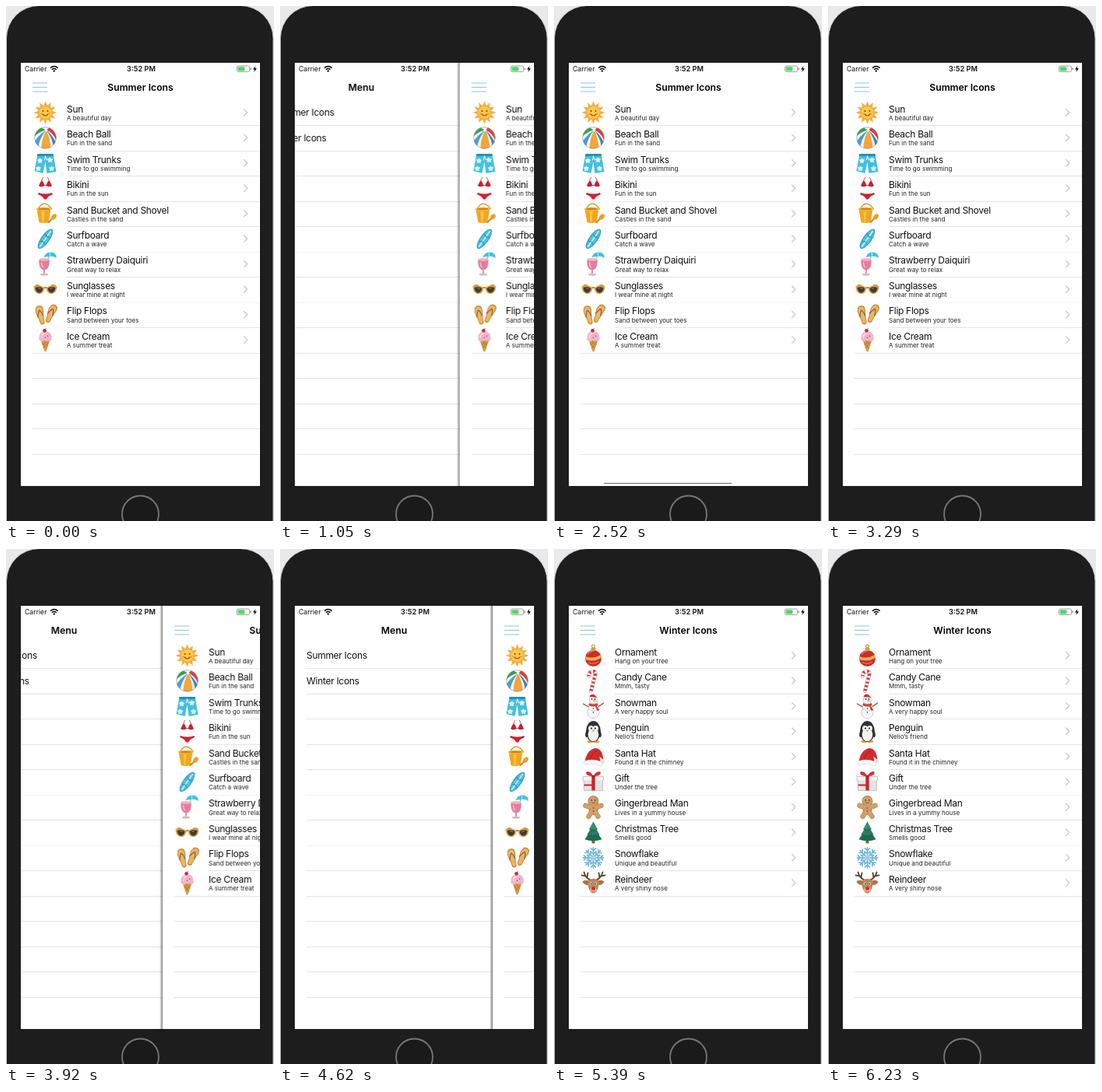
Animation of 344x662 px, one loop 6300 ms. Source, as an HTML page:

```html
<!DOCTYPE html>
<html lang="en">
<head>
<meta charset="utf-8">
<title>Side menu</title>
<style>
  html, body { margin: 0; width: 100%; height: 100%; overflow: hidden; background: #e9e9eb; }
  svg { display: block; width: 344px; height: 662px; }
  text { font-family: Inter, Roboto, sans-serif; fill: #111; }
  .name { font-size: 12px; letter-spacing: -.3px; }
  .sub { font-size: 8px; letter-spacing: .03px; fill: #222; }
  .title { font-size: 12.2px; font-weight: 600; text-anchor: middle; fill: #000; }
  .slide, .under, .dim, .push, .old, .new, .mark { animation: 6300ms linear infinite; }
  .slide { animation-name: slide; }
  .under { animation-name: under; }
  .dim { animation-name: dim; }
  .push { animation-name: push; }
  .old { animation-name: old; }
  .new { animation-name: new; }
  .mark { animation-name: mark; animation-timing-function: step-end; }
  @keyframes slide {
    0%, 36.762%, 80.24%, 100% { transform: translateX(0); }
    18.254%, 64.286% { transform: translateX(254px); }
    12.698%, 58.73% { transform: translateX(0); animation-timing-function: ease-in-out; }
    31.206%, 74.603% { transform: translateX(254px); animation-timing-function: ease-in-out; }
  }
  @keyframes under {
    0% { transform: translateX(0); }
    75.238% { transform: translateX(0); animation-timing-function: cubic-bezier(.33, 1, .68, 1); }
    83.175%, 100% { transform: translateX(-92px); }
  }
  @keyframes dim {
    0% { opacity: 0; }
    75.238% { opacity: 0; animation-timing-function: cubic-bezier(.33, 1, .68, 1); }
    83.175%, 100% { opacity: .1; }
  }
  @keyframes push {
    0% { transform: translateX(307px); }
    75.238% { transform: translateX(307px); animation-timing-function: cubic-bezier(.33, 1, .68, 1); }
    83.175%, 100% { transform: translateX(0); }
  }
  @keyframes old {
    0% { opacity: 1; transform: translateX(0); }
    75.238% { opacity: 1; transform: translateX(0); animation-timing-function: cubic-bezier(.33, 1, .68, 1); }
    80%, 100% { opacity: 0; transform: translateX(-25px); }
  }
  @keyframes new {
    0% { opacity: 0; transform: translateX(25px); }
    75.238% { opacity: 0; transform: translateX(25px); animation-timing-function: cubic-bezier(.33, 1, .68, 1); }
    83.175%, 100% { opacity: 1; transform: translateX(0); }
  }
  @keyframes mark {
    0% { opacity: 0; }
    32.2% { opacity: 1; }
    46.6%, 100% { opacity: 0; }
  }
</style>
</head>
<body>
<svg viewBox="0 0 344 662">
  <defs>
    <clipPath id="screen"><rect x="19" y="73" width="307" height="544"/></clipPath>
    <linearGradient id="edge">
      <stop offset="0" stop-color="#000" stop-opacity="0"/>
      <stop offset="1" stop-color="#000" stop-opacity=".5"/>
    </linearGradient>
  </defs>
  <rect y="72" width="3" height="143" fill="#333"/>
  <rect x=".5" y="-.5" width="342.5" height="760" rx="42" fill="#1d1d1e" stroke="#cfcfd2"/>
  <circle cx="172.5" cy="653" r="23.5" fill="#1a1a1b" stroke="#77777a" stroke-width="1.8"/>
  <g clip-path="url(#screen)">
    <rect x="19" y="73" width="307" height="544" fill="#fff"/>
    <g class="slide">
      <g id="menu" transform="translate(-254)"></g>
      <rect x="15" y="73" width="4" height="544" fill="url(#edge)"/>
      <g clip-path="url(#screen)">
        <g class="under" id="summer"></g>
        <rect class="dim" x="19" y="73" width="307" height="544"/>
        <g class="push" id="winter"></g>
        <rect x="19" y="73" width="307" height="48" fill="#fff"/>
        <path d="M34 99H53M34 104.5H53M34 110H53" stroke="#8cc3e6" stroke-width="1.2"/>
        <text class="title old" x="172.5" y="109">Summer Icons</text>
        <text class="title new" x="172.5" y="109">Winter Icons</text>
      </g>
    </g>
    <rect class="mark" x="64" y="613" width="164" height="1.2" fill="#777"/>
    <text x="24" y="84.3" font-size="8.7">Carrier</text>
    <g fill="none" stroke="#000" stroke-width="1.4">
      <path d="M57 79.6Q61.8 75.4 66.6 79.6M58.9 81.7Q61.8 79.2 64.7 81.7"/>
    </g>
    <path d="M60.2 83.2Q61.8 82 63.4 83.2L61.8 85Z"/>
    <text x="173.5" y="84.3" font-size="9.2" font-weight="600" text-anchor="middle">3:52 PM</text>
    <rect x="296.5" y="77" width="16" height="7.6" rx="2" fill="#fff" stroke="#8a8a8a" stroke-width=".8"/>
    <rect x="297.7" y="78.2" width="8.6" height="5.2" rx="1" fill="#4cd964"/>
    <rect x="313.4" y="79.3" width="1.3" height="3" rx=".6" fill="#8a8a8a"/>
    <path d="M320.4 77L317 81.6H319.2L318.4 85L321.8 80.3H319.6Z"/>
  </g>
</svg>
<script>
const circle = (x, y, r, fill) => `<circle cx="${x}" cy="${y}" r="${r}" fill="${fill}"/>`;
const oval = (x, y, rx, ry, fill, turn = 0) =>
  `<ellipse rx="${rx}" ry="${ry}" fill="${fill}" transform="translate(${x} ${y}) rotate(${turn})"/>`;
const shape = (d, fill) => `<path d="${d}" fill="${fill}"/>`;
const line = (d, color, width = 1) =>
  `<path d="${d}" fill="none" stroke="${color}" stroke-width="${width}" stroke-linecap="round" stroke-linejoin="round"/>`;
const spin = (n, art) =>
  Array.from({ length: n }, (_, i) => `<g transform="rotate(${i * 360 / n})">${art}</g>`).join('');
const turn = (x, y, a, art) => `<g transform="translate(${x} ${y}) rotate(${a})">${art}</g>`;
const mirror = art => art + `<g transform="scale(-1 1)">${art}</g>`;

const flower = (x, y) => turn(x, y, 0, spin(5, oval(0, -1.8, 1.2, 1.7, '#e6f8fb')));
const sandal = (x, y, a) => turn(x, y, a,
  shape('M-4-11Q0-15 4.5-11Q6-7 4-1Q3 5 3 10Q0 14-3 10Q-3 4-5-2Q-6-7-4-11Z', '#c88a3c') +
  shape('M-3-10Q0-13 3.3-10Q4.6-7 3-1Q2 5 2 9Q0 12-2 9Q-2 4-4-2Q-5-7-3-10Z', '#efb562') +
  line('M-4 1Q-2-5 0-7Q2-5 3 1', '#7d6650', 1.3));

const summer = [
  ['Sun', 'A beautiful day',
    spin(12, shape('M-2.6-8L0-15L2.6-8Z', '#f3ad45')) + circle(0, 0, 9.2, '#f5a93a') + circle(0, 0, 8, '#fdc94c') +
    circle(-3, -2, 1, '#754516') + circle(3, -2, 1, '#754516') + line('M-3.5 2Q0 6 3.5 2', '#a2521c', 1.2) +
    circle(-5, 1.5, 1.3, '#f49a4b') + circle(5, 1.5, 1.3, '#f49a4b')],
  ['Beach Ball', 'Fun in the sand',
    circle(0, 0, 14, '#f7f7f4') +
    shape('M1-10Q-8-8-13.7-2A14 14 0 0 1-5-13Z', '#37a052') +
    shape('M1-10Q-9-3-13.4 4A14 14 0 0 0-9 10.7Q-7 0 1-10Z', '#4a9fd0') +
    shape('M1-10Q-5 2-5 13A14 14 0 0 0 7 12Q6 0 1-10Z', '#f2a63c') +
    shape('M1-10Q10-7 13.6 3A14 14 0 0 0 5-13Z', '#d8403c') +
    shape('M1-10Q9 0 10 9.8A14 14 0 0 0 13 5Q8-5 1-10Z', '#3c7fbd') +
    circle(1, -10, 1.8, '#fff') + '<circle r="13.8" fill="none" stroke="#8a8d88" stroke-width=".6"/>'],
  ['Swim Trunks', 'Time to go swimming',
    shape('M-10-12H10L14 11L2 13L0-2L-3 13L-14 10Z', '#43bfdf') + shape('M-10-12H10L10.5-9H-10.6Z', '#238fb8') +
    flower(-7, -3) + flower(-9, 7) + flower(6, -4) + flower(8, 7) + line('M0-9L-1-4M0-9L2-4', '#fff')],
  ['Bikini', 'Fun in the sun',
    line('M-7-5L-3-14M7-5L3-14M-8-4H8', '#c82635', .8) +
    mirror(shape('M1-3.5Q3-10 4.5-10Q8-6 8-3Q4-1 1-3.5Z', '#c91f31')) +
    shape('M-8 6Q0 8 8 6L7.5 8.5Q3 10 1.5 14H-1.5Q-3 10-7.5 8.5Z', '#d0222f') + mirror(circle(8, 7, 1.2, '#bb1e2a'))],
  ['Sand Bucket and Shovel', 'Castles in the sand',
    line('M-10-5Q-2-20 8-6', '#d08a24', 1.3) + shape('M-11-6H7L4 11Q-3 13-8 11Z', '#f3a51f') +
    shape('M-5-3H-1L-2 11H-4Z', '#f9c34a') + oval(-2, -6, 10, 2.4, '#ffc93e') + oval(-2, -6, 8, 1.4, '#c98420') +
    line('M4 11L10 5', '#d97b1d', 2) + oval(11, 4, 4, 2.8, '#ee9c2a', -50)],
  ['Surfboard', 'Catch a wave',
    turn(0, 0, 35, oval(0, 0, 5.5, 15, '#2a8fb8') + oval(0, 0, 4.5, 14, '#4fc1df') +
      line('M0-12V12', '#d9f3f8', 1.4) + line('M-3-5Q0-2 3-5M-3 6Q0 3 3 6', '#1d83b0'))],
  ['Strawberry Daiquiri', 'Great way to relax',
    line('M2-3L6-13', '#7d9da6') + shape('M-2-9Q1-17 10-15Q15-13 14-8Q10-11 6-10Q2-10-2-9Z', '#3fc3df') +
    line('M6-15L6-10', '#b9ebf2') + shape('M-8-6H5Q6 4 1 7H-4Q-9 4-8-6Z', '#e67d9c') +
    oval(-1.5, -6, 6.5, 1.8, '#f5b2c3') + line('M-5-2Q-5 2-3 4', '#f7c6d4', 1.3) +
    line('M-1.5 7V12', '#c998a8', 2) + oval(-1.5, 13, 5, 1.5, '#d8b5c0')],
  ['Sunglasses', 'I wear mine at night',
    line('M-13-4Q-12-6-8-5M13-4Q12-6 8-5M-3-1Q0-4 3-1', '#c88d2e', 2) +
    mirror(shape('M1-2Q7-7 15-4Q15 5 8 6Q2 6 1-2Z', '#dfa23e') + shape('M3-1Q7-5 13-2Q12 4 8 4.5Q4 4 3-1Z', '#3e3a38') +
      line('M6-1L9-2', '#8d8880'))],
  ['Flip Flops', 'Sand between your toes', sandal(-6, 1, -14) + sandal(7, -1, 24)],
  ['Ice Cream', 'A summer treat',
    shape('M-6 0H6L1 15H-1Z', '#d99b49') + line('M-4 4L2 11M-1 2L3 7M4 3L-2 10M1 2L-3 6', '#a96a2b', .7) +
    shape('M-8 0Q-9-11 0-11Q9-11 8 0Q5 3 3 0Q1 3-1 0Q-4 4-8 0Z', '#f3b4ca') +
    line('M-5-3Q-5-8-1-8', '#fbdbe5', 1.6) + circle(-1, -12, 2.3, '#c92642') + line('M-1-13L1-15', '#694429', .7) +
    circle(3, -5, .8, '#8e5540') + circle(0, -3, .8, '#8e5540')]
];

const winter = [
  ['Ornament', 'Hang on your tree',
    circle(0, 3.5, 10.5, '#c92d2b') + shape('M-10 1Q0 5 9.5-1L10.5 3Q0 9-10 5Z', '#eab04a') +
    line('M-7-2Q-4-6 0-6M-6 9Q0 12 6 8', '#ef7163', 1.3) + shape('M-3-10H3V-6H-3Z', '#d7a23c') +
    '<circle cy="-12" r="2" fill="none" stroke="#ad8335"/>'],
  ['Candy Cane', 'Mmm, tasty',
    line('M-3 13L2-6Q4-13-2-12Q-6-11-6-6', '#c98f8f', 5) + line('M-3 13L2-6Q4-13-2-12Q-6-11-6-6', '#fff', 4) +
    '<path d="M-3 13L2-6Q4-13-2-12Q-6-11-6-6" fill="none" stroke="#d4343a" stroke-width="4" stroke-dasharray="2.5 2.5"/>'],
  ['Snowman', 'A very happy soul',
    line('M-6 1L-13-3M6 1L13-4', '#765036', 1.2) +
    [[0, 8, 8], [0, 0, 6.5], [0, -8, 5.5]].map(([x, y, r]) => circle(x, y, r, '#a9b5bd') + circle(x, y, r - .6, '#f4f7f8')).join('') +
    shape('M-5-4Q0-1 5-4L6-1Q0 2-6-1ZM3-2L8 5L5 6L2-1Z', '#d53a35') +
    circle(-2, -9, .9, '#222') + circle(2, -9, .9, '#222') + shape('M0-8L5-6.5L0-6Z', '#ee8a2d') +
    circle(0, 3, .8, '#333') + circle(0, 8, .8, '#333') + shape('M-5-12Q-4-16 1-15L5-11Z', '#cf3331')],
  ['Penguin', 'Nelio\u2019s friend',
    mirror(shape('M6-4Q13 3 9 8L6 5Z', '#2b2d30') + oval(4, 13, 4, 1.8, '#e8a437')) +
    oval(0, 0, 9.5, 13.5, '#303236') + oval(0, 4, 6.8, 8.8, '#f3f4f3') + mirror(circle(3, -4, 3.5, '#f3f4f3')) +
    mirror(circle(2.5, -4, 1, '#111')) + shape('M-2-2H2L0 1Z', '#e8a437')],
  ['Santa Hat', 'Found it in the chimney',
    shape('M-11 7Q-9-8 2-11Q12-11 13 5Q9 0 8 0Q9 5 9 8Z', '#d32b2c') + line('M-4 3Q-2-5 4-7', '#a81c22', 1) +
    line('M-10 8Q0 5 9 9', '#cfd3d6', 5.6) + line('M-10 8Q0 5 9 9', '#f8f8f8', 4.6) +
    circle(12, 6, 2.8, '#dfe2e4')],
  ['Gift', 'Under the tree',
    shape('M-12-5H12V11H-12Z', '#e6e4e2') + shape('M-13-7H13V-2H-13Z', '#f7f5f3') +
    shape('M-2.2-7H2.2V11H-2.2ZM-12 3H-2V5H-12Z', '#c8262d') +
    mirror(shape('M0-7Q4-15 9-13Q11-8 0-7Z', '#d4323a')) +
    line('M-13-7H13V-2H12V11H-12V-2H-13Z', '#a49d9a', .6) + circle(0, -7, 2, '#aa1c25')],
  ['Gingerbread Man', 'Lives in a yummy house',
    line('M0 1L-10-2M0 1L10-2M-1 4L-6 12M1 4L6 12', '#b68452', 6.4) + oval(0, 3, 6, 7, '#b68452') + circle(0, -8, 7, '#b68452') +
    line('M0 1L-10-2M0 1L10-2M-1 4L-6 12M1 4L6 12', '#cfa06c', 5) + circle(0, -8, 6, '#cfa06c') +
    mirror(circle(2.3, -9, .9, '#5a3a21')) + line('M-2.5-6Q0-4 2.5-6', '#6b4326', .8) +
    circle(0, 1, 1, '#c8383b') + circle(0, 5, 1, '#c8383b')],
  ['Christmas Tree', 'Smells good',
    shape('M-2 9H2V14H-2Z', '#8a5a34') + shape('M0-7L11 9Q0 13-11 9Z', '#1f6a55') +
    shape('M0-11L8 3Q0 6-8 3Z', '#2a7c61') + shape('M0-14L5.5-4Q0-2-5.5-4Z', '#359072') +
    line('M-4-4Q0-2 4-4M-6 3Q0 6 6 3', '#175341', .8)],
  ['Snowflake', 'Unique and beautiful',
    spin(8, line('M0 0V-13M-3-12L0-9L3-12M-3.4-8L0-5L3.4-8', '#75b6da', 1.7)) + circle(0, 0, 3, '#9fd0e9')],
  ['Reindeer', 'A very shiny nose',
    mirror(line('M4-4Q10-6 12-14M8-7L7-13M10-9L15-10', '#59402d', 1.8) +
      shape('M5-3Q13-5 14-1Q10 4 6 2Z', '#a8744a')) +
    shape('M-7-3Q0-8 7-3Q8 4 4 11Q0 15-4 11Q-8 4-7-3Z', '#bb8658') + oval(0, 9, 4.3, 4.5, '#dcb78e') +
    mirror(oval(3, 1, 1.5, 1.9, '#fff') + circle(2.8, 1.3, 1, '#2b1c13')) + circle(0, 7, 2.5, '#d52c2f') +
    line('M-2 11.5Q0 13 2 11.5', '#694327', .7)]
];

const STEP = 32.48;
const rules = start => Array.from({ length: 14 }, (_, i) => {
  const faint = i === 5 || i === 7;
  return `<rect x="${start(i)}" y="${Math.round(153.3 + STEP * i)}" width="400" height="1" fill="${faint ? '#f3f3f4' : '#e4e4e6'}"/>`;
}).join('');

const row = ([name, sub, icon], i) => `<g transform="translate(0 ${STEP * i})">
  <g transform="translate(50.5 137)">${icon}</g>
  <text class="name" x="78" y="136.6">${name}</text>
  <text class="sub" x="78" y="147">${sub}</text>
  ${line('M305.5 132.6L309.8 136.8L305.5 141', '#c4c4c9', 1.2)}</g>`;

const put = (id, html) => { document.getElementById(id).innerHTML = html; };
const page = '<rect x="19" y="73" width="307" height="544" fill="#fff"/>';
const list = rows => page + rules(i => i < 9 ? 78 : 34) + rows.map(row).join('');

put('summer', list(summer));
put('winter', list(winter));
put('menu', page + rules(() => 34) +
  '<text class="title" x="146.5" y="109">Menu</text>' +
  ['Summer Icons', 'Winter Icons'].map((t, i) =>
    `<text class="name" x="34" y="${141.3 + STEP * i}">${t}</text>`).join(''));
</script>
</body>
</html>
```
